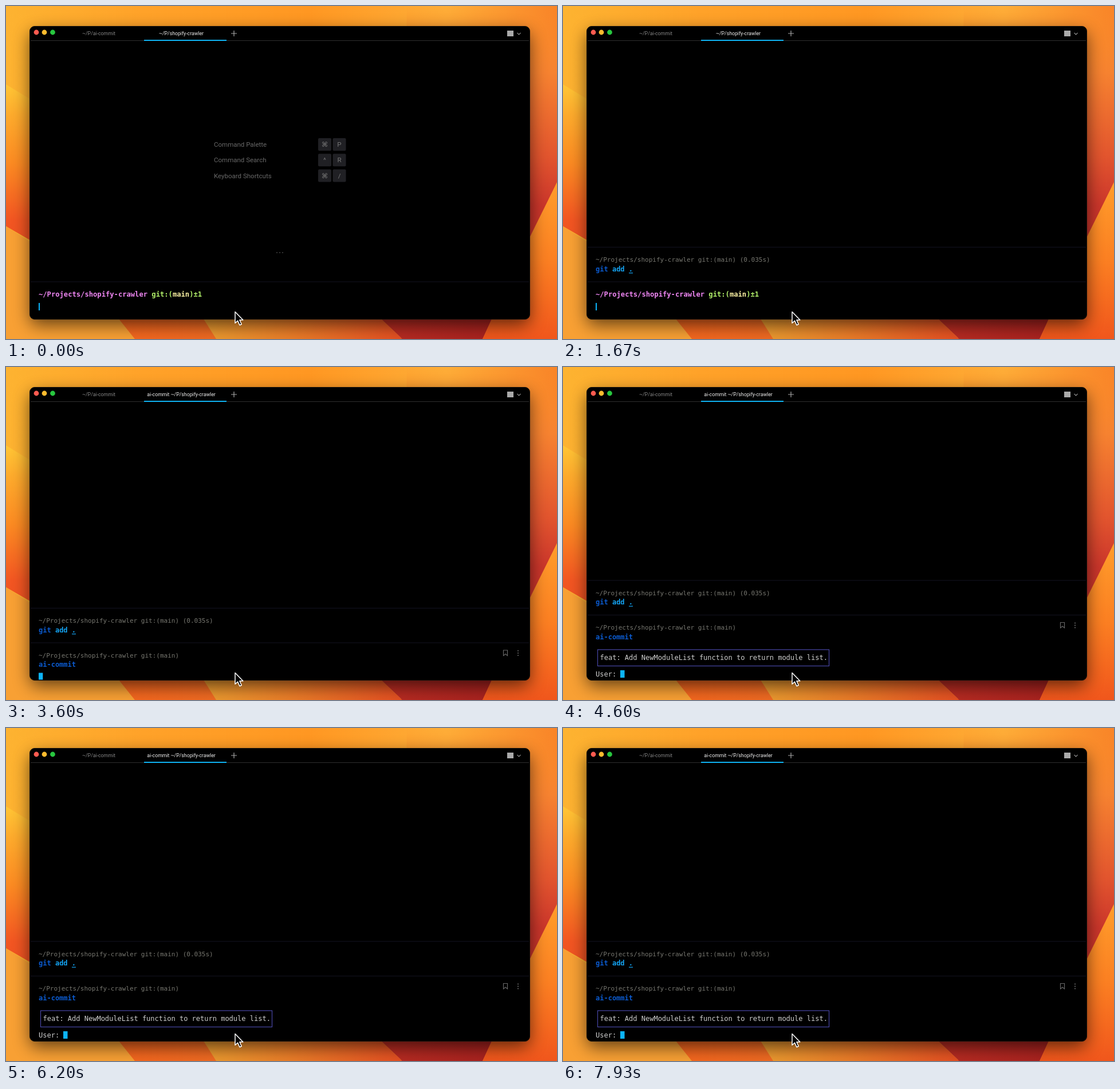
An HTML page for the animation above (8000 ms loop, 962 px wide and 582 px high).

```html
<!DOCTYPE html>
<html lang="en">
<head>
<meta charset="utf-8">
<title>Terminal</title>
<style>
  html, body { margin: 0; width: 100%; height: 100%; overflow: hidden; background: #000; }
  svg { display: block; width: 962px; height: 582px; }
  text { white-space: pre; }
  .mono { font: 12px "DejaVu Sans Mono", monospace; }
  .ui { font: 11.5px Roboto, sans-serif; fill: #686868; }
  .tab { font: 8.75px Roboto, sans-serif; text-anchor: middle; fill: #858585; }
  .key { text-anchor: middle; font-family: Roboto, "DejaVu Sans", sans-serif; fill: #777; }
  .small { font-size: 11px; fill: #777770; }
  .bold { font-weight: bold; }
  .prompt { font-size: 12.15px; fill: #ef86f3; }
  .green { fill: #b4f36b; }
  .cream { fill: #fdf3a4; }
  .blue { fill: #0b5bd0; }
  .sky { fill: #14a5f5; }
  .cursor { fill: #0cb4fa; }
  .light { fill: #cfcfcf; }
  .ghost { fill: #48566a; }
  .rule { stroke: #121220; }
  .icon { fill: none; stroke: #666; stroke-width: 1.2; }
  [hidden] { display: none; }
</style>
</head>
<body>
<svg viewBox="0 0 962 582">
  <defs>
    <linearGradient id="top">
      <stop offset="0" stop-color="#fdb331"/>
      <stop offset=".25" stop-color="#ffa229"/>
      <stop offset=".55" stop-color="#ff9722"/>
      <stop offset=".8" stop-color="#feae38"/>
      <stop offset="1" stop-color="#f98428"/>
    </linearGradient>
    <linearGradient id="left" x2="0" y2="1">
      <stop offset="0" stop-color="#ffc535"/>
      <stop offset=".15" stop-color="#fdaa2c"/>
      <stop offset=".38" stop-color="#fb8a22"/>
      <stop offset=".65" stop-color="#f25622"/>
      <stop offset="1" stop-color="#e84722"/>
    </linearGradient>
    <linearGradient id="right" x2="0" y2="1">
      <stop offset="0" stop-color="#f98c2a" stop-opacity="0"/>
      <stop offset=".2" stop-color="#f68230"/>
      <stop offset=".45" stop-color="#e2552e"/>
      <stop offset=".6" stop-color="#cb362b"/>
      <stop offset="1" stop-color="#b42826"/>
    </linearGradient>
    <linearGradient id="corner" x2="0" y2="1">
      <stop offset="0" stop-color="#ff9d2b"/>
      <stop offset=".5" stop-color="#fb7f22"/>
      <stop offset="1" stop-color="#f0561c"/>
    </linearGradient>
    <linearGradient id="ember">
      <stop offset="0" stop-color="#f4661e"/>
      <stop offset="1" stop-color="#ee6a22"/>
    </linearGradient>
    <linearGradient id="gold">
      <stop offset="0" stop-color="#eb9c30"/>
      <stop offset=".45" stop-color="#ea7c28"/>
      <stop offset="1" stop-color="#e44f22"/>
    </linearGradient>
    <linearGradient id="wine">
      <stop offset="0" stop-color="#b82c22"/>
      <stop offset="1" stop-color="#a8221f"/>
    </linearGradient>
    <filter id="blur" x="-10%" y="-15%" width="120%" height="130%">
      <feGaussianBlur stdDeviation="15"/>
    </filter>
    <clipPath id="frame"><rect x="42" y="36" width="872" height="511" rx="8"/></clipPath>
  </defs>

  <g id="wallpaper">
    <rect width="962" height="582" fill="url(#top)"/>
    <path d="M0 137 200 260V500L0 385Z" fill="url(#left)"/>
    <path d="M0 385 200 514V547L225 582H0Z" fill="#f8a034"/>
    <path d="M700 0H962V308L832 582H690Z" fill="url(#right)"/>
    <path d="M197 547H345L370 582H225Z" fill="url(#ember)"/>
    <path d="M345 547H655L692 582H367Z" fill="url(#gold)"/>
    <path d="M655 547H848L832 582H692Z" fill="url(#wine)"/>
    <path d="M962 308 914 405 848 547 832 582H962Z" fill="url(#corner)"/>
  </g>

  <rect x="42" y="46" width="872" height="511" rx="10" opacity=".6" filter="url(#blur)"/>
  <rect x="41.5" y="35.5" width="873" height="512" rx="8.5" stroke="#15110c"/>

  <g id="header">
    <circle cx="53" cy="46" r="4.4" fill="#ff5b50"/>
    <circle cx="67" cy="46" r="4.4" fill="#fdbb2e"/>
    <circle cx="81.5" cy="46" r="4.4" fill="#28c73f"/>
    <path d="M43 60.5H913" stroke="#2e2e2e"/>
    <rect x="241" y="59" width="144" height="2" fill="#0fb2f2"/>
    <text class="tab" x="162" y="51">~/P/ai-commit</text>
    <text class="tab" id="title" x="306" y="51" style="fill:#eee"></text>
    <path class="icon" d="M393 48H403M398 43V53" style="stroke:#aaa"/>
    <rect x="875" y="43" width="11" height="10" fill="#aaa"/>
    <path class="icon" d="M892.5 46.8 895.5 49.8 898.5 46.8" style="stroke:#999"/>
  </g>

  <g id="hints">
    <g id="shortcuts"></g>
    <g fill="#444"><circle cx="473" cy="431" r="1"/><circle cx="478" cy="431" r="1"/><circle cx="483" cy="431" r="1"/></g>
  </g>

  <g clip-path="url(#frame)">
    <g id="history">
      <g id="added">
        <path class="rule" d="M43 421.5H913"/>
        <text class="mono small" x="57" y="447">~/Projects/shopify-crawler git:(main) (0.035s)</text>
        <text class="mono bold blue" x="57" y="463.5">git <tspan class="sky">add .</tspan></text>
        <rect class="sky" x="115" y="466" width="7" height="1.2"/>
      </g>
      <path class="rule" d="M43 482H913"/>
      <g id="commit">
        <text class="mono small" x="57" y="507.5">~/Projects/shopify-crawler git:(main)</text>
        <text class="mono bold blue" x="57" y="524">ai-commit</text>
        <path class="icon" d="M868.5 495H875.5V504.5L872 501.5 868.5 504.5Z"/>
        <g fill="#666"><circle cx="894" cy="496" r="1.1"/><circle cx="894" cy="500" r="1.1"/><circle cx="894" cy="504" r="1.1"/></g>
      </g>
    </g>

    <rect id="waiting" class="cursor" x="57" y="534.5" width="7.3" height="12"/>

    <g id="reply">
      <rect x="60.5" y="494" width="404" height="28.5" fill="none" stroke="#4846a6" stroke-width="1.2"/>
      <text class="mono light" x="64.5" y="511.5">feat: Add NewModuleList function to return module list.</text>
      <text class="mono light" x="57" y="540.5">User:</text>
      <rect class="cursor" x="100" y="530" width="7.5" height="13"/>
    </g>

    <g id="input">
      <text class="mono bold prompt" x="57" y="508">~/Projects/shopify-crawler <tspan class="green">git:(<tspan class="cream">main</tspan>)±1</tspan></text>
      <text class="mono" x="57" y="529"><tspan id="command" fill="#c3e88d"></tspan><tspan id="rest" class="light"></tspan><tspan id="suggestion" class="ghost"></tspan></text>
      <rect id="caret" class="cursor" y="519" width="2" height="13"/>
    </g>
  </g>

  <path d="M400 534.5V554.2L404.6 550.1 408 557.8 411.2 556.3 407.9 548.8H413.8Z" fill="#000" stroke="#fff" stroke-width="1.5" stroke-linejoin="round"/>
</svg>
<script>
  const LOOP = 8000, ADVANCE = 7.224;
  const ENTER_ADD = 1470, ENTER_COMMIT = 3200, REPLY = 4400;
  const entries = [
    { text: 'git add .', command: 3, keys: [270, 400, 530, 670, 800, 1000, 1070, 1130, 1200] },
    { text: 'ai-commit', command: 9, keys: Array.from({ length: 9 }, (_, i) => 2330 + i * 90) }
  ];
  const $ = id => document.getElementById(id);
  const show = (id, on) => $(id).toggleAttribute('hidden', !on);

  const shortcuts = [['Command Palette', '⌘', 'P'], ['Command Search', '^', 'R'], ['Keyboard Shortcuts', '⌘', '/']];
  $('shortcuts').innerHTML = shortcuts.map(([label, ...keys], row) => {
    const y = 242 + row * 27.3;
    const caps = keys.map((key, i) => {
      const x = 556.5 + i * 25.5;
      return `<rect x="${x - 11.5}" y="${y - 11}" width="23" height="22" rx="2" fill="#202024"/>
        <text class="ui key" x="${x}" y="${y + 4}">${key}</text>`;
    });
    return `<text class="ui" x="363" y="${y + 4}">${label}</text>${caps.join('')}`;
  }).join('');

  function typeLine(t) {
    const { text, command, keys } = entries[t < ENTER_ADD ? 0 : 1];
    const count = keys.filter(at => t >= at).length;
    $('command').textContent = text.slice(0, Math.min(count, command));
    $('rest').textContent = text.slice(command, Math.max(count, command));
    $('suggestion').textContent = count ? text.slice(count) : '';
    $('caret').setAttribute('x', 57 + count * ADVANCE);
  }

  function draw(now) {
    const t = now % LOOP;
    const running = t >= ENTER_COMMIT, replied = t >= REPLY;
    show('hints', t < ENTER_ADD);
    show('added', t >= ENTER_ADD);
    show('commit', running);
    show('waiting', running && !replied);
    show('reply', replied);
    show('input', !running);
    $('history').setAttribute('transform', `translate(0 ${replied ? -48.5 : 0})`);
    $('title').textContent = (running ? 'ai-commit ' : '') + '~/P/shopify-crawler';
    if (!running) typeLine(t);
    requestAnimationFrame(() => draw(performance.now()));
  }
  draw(performance.now());
</script>
</body>
</html>
```
